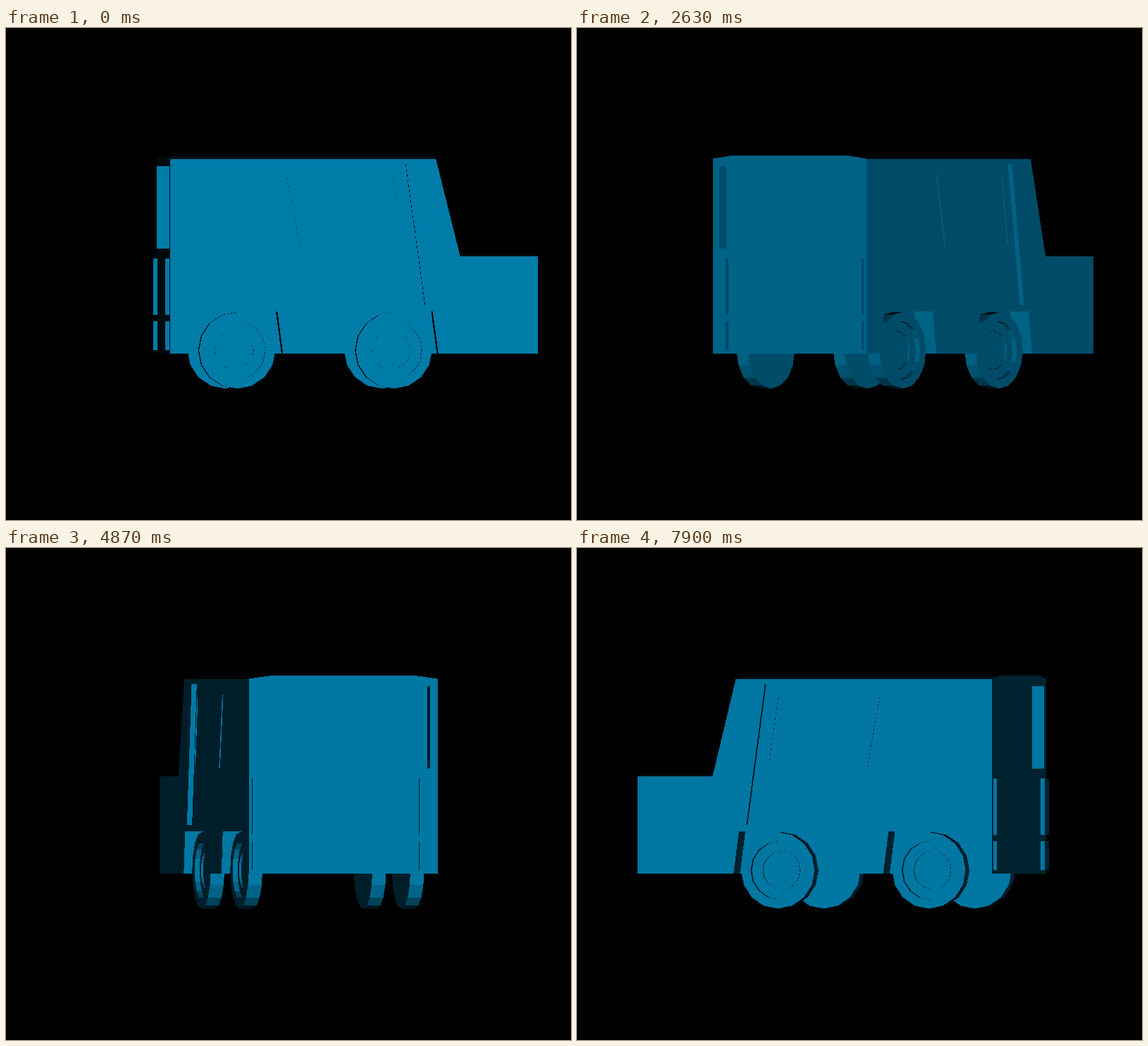
An HTML page without scripts for the animation above (8 s loop, 802 px wide and 698 px high).

```html
<!DOCTYPE html>
<html lang="en">
<head>
<meta charset="utf-8">
<title>Turning truck</title>
<style>
@property --a { syntax: "<angle>"; inherits: true; initial-value: 4deg; }

html, body { margin: 0; width: 100%; height: 100%; overflow: hidden; background: #000; }

/* --a turn, --c/--s its cosine and sine, --g the sign of the side in view */
svg {
  display: block; width: 100%; height: 100%;
  shape-rendering: crispEdges;
  --c: cos(var(--a));
  --s: sin(var(--a));
  --abs: max(var(--c), -1 * var(--c));
  --g: calc(var(--c) / var(--abs));
  --x: 0; --y: 0; --z: 0; --m: 1; --o: 0;
  animation: turn 8s steps(1) infinite;
}

/* 4 degrees per step, with uneven pauses */
@keyframes turn {
  0% { --a: 4deg; }
  1.75% { --a: 8deg; animation-timing-function: steps(3); }
  9.5% { --a: 20deg; }
  12.375% { --a: 24deg; }
  14.5% { --a: 28deg; }
  17.375% { --a: 32deg; animation-timing-function: steps(3); }
  25% { --a: 44deg; }
  27.875% { --a: 48deg; }
  30.75% { --a: 52deg; animation-timing-function: steps(4); }
  40.5% { --a: 68deg; }
  42.375% { --a: 72deg; }
  45.25% { --a: 76deg; animation-timing-function: steps(6); }
  58% { --a: 100deg; }
  60.875% { --a: 104deg; }
  63.75% { --a: 108deg; animation-timing-function: steps(4); }
  73.5% { --a: 124deg; }
  75.625% { --a: 128deg; animation-timing-function: steps(3); }
  83.25% { --a: 140deg; }
  86.125% { --a: 144deg; }
  88% { --a: 148deg; }
  90.875% { --a: 152deg; animation-timing-function: steps(3); }
  98.75%, 100% { --a: 164deg; }
}

/* flat shading, lit from the viewer */
.side, .disc, .roof, .rear, .wall, .facet {
  fill: rgb(0 calc(124 * var(--k)) calc(169 * var(--k)));
}
.side, .disc { --k: var(--abs); }
.rear, .wall { --k: var(--s); }
.roof { --k: calc(.12 * var(--abs)); }

/* planes along the truck, across it, and slanted walls */
.side, .roof { transform: matrix(var(--c), 0, 0, 1, calc(var(--z) * var(--g) * var(--s)), 0); }
.rear { transform: matrix(var(--s), 0, 0, 1, calc(var(--x) * var(--c)), 0); }
.wall {
  transform: matrix(calc(var(--g) * var(--s)), 0, calc(var(--lean) * var(--c)), 1,
    calc(var(--x) * var(--c)), var(--top));
}
.at { transform: matrix(1, 0, 0, 1, calc(var(--o) * var(--c)), var(--y)); }

/* sixteen-sided discs and the facets of their rims */
.disc {
  transform: matrix(calc(var(--r) * var(--c)), 0, 0, var(--r),
    calc(var(--x) * var(--c) + var(--g) * var(--z) * var(--s)), 0);
}
.facet {
  --p: calc(var(--i) * 22.5deg);
  --q: calc(var(--p) + 22.5deg);
  --k: calc(var(--s) * sin(var(--p) + 11.25deg));
  transform: matrix(
    calc(var(--g) * var(--w) * var(--s)), 0,
    calc(var(--m) * var(--r) * (sin(var(--p)) - sin(var(--q))) * var(--c)),
    calc(var(--r) * (cos(var(--p)) - cos(var(--q)))),
    calc((var(--x) - var(--m) * var(--r) * sin(var(--p))) * var(--c) + var(--g) * var(--z) * var(--s)),
    calc(-1 * var(--r) * cos(var(--p))));
}
</style>
</head>
<body>
<svg viewBox="-429 0 802 698">
  <defs>
    <path id="poly" d="M1 0L.924 .383L.707 .707L.383 .924L0 1L-.383 .924L-.707 .707L-.924 .383L-1 0L-.924 -.383L-.707 -.707L-.383 -.924L0 -1L.383 -.924L.707 -.707L.924 -.383z"/>
    <g id="rim">
      <path class="facet" style="--i:0" d="M0 0h1v1h-1z"/>
      <path class="facet" style="--i:1" d="M0 0h1v1h-1z"/>
      <path class="facet" style="--i:2" d="M0 0h1v1h-1z"/>
      <path class="facet" style="--i:3" d="M0 0h1v1h-1z"/>
      <path class="facet" style="--i:4" d="M0 0h1v1h-1z"/>
      <path class="facet" style="--i:5" d="M0 0h1v1h-1z"/>
      <path class="facet" style="--i:6" d="M0 0h1v1h-1z"/>
      <path class="facet" style="--i:7" d="M0 0h1v1h-1z"/>
    </g>
    <clipPath id="opening">
      <use class="disc" href="#poly" style="--r:41.5;--z:128;--x:-1"/>
    </clipPath>

    <g id="far">
      <use href="#rim" style="--r:54.3;--z:-128.5;--w:20"/>
      <use class="disc" href="#poly" style="--r:54.3;--z:-108.5"/>
    </g>
    <g id="near">
      <use href="#rim" style="--r:54.3;--z:108;--w:20"/>
      <use class="disc" href="#poly" style="--r:54.3;--z:128"/>
      <g clip-path="url(#opening)">
        <use href="#rim" style="--r:41.5;--z:120.5;--w:7.5;--x:-1;--m:-1"/>
        <use class="disc" href="#poly" style="--r:41.5;--z:120.5;--x:-1"/>
        <use href="#rim" style="--r:28;--z:120.5;--w:2;--x:-3"/>
        <use class="disc" href="#poly" style="--r:28;--z:122.5;--x:-3"/>
        <use href="#rim" style="--r:27;--z:119.5;--w:3;--x:-3;--m:-1"/>
        <use class="disc" href="#poly" style="--r:27;--z:119.5;--x:-3"/>
      </g>
    </g>
    <g id="arch">
      <path class="side" style="--z:105" d="M-57 402H55L63 461.700H-66z"/>
      <path class="wall" style="--x:55;--lean:.136;--top:402" d="M105 0h33.300v59.700h-33.300z"/>
    </g>
  </defs>

  <use class="at" href="#far" style="--o:113;--y:457.3"/>
  <use class="at" href="#far" style="--o:-110;--y:457.3"/>

  <use class="at" href="#arch" style="--o:112.5"/>
  <use class="at" href="#arch" style="--o:-108.5"/>
  <use class="at" href="#near" style="--o:113;--y:457.3"/>
  <use class="at" href="#near" style="--o:-110;--y:457.3"/>

  <!-- body side with wheel cut-outs -->
  <path class="roof" style="--z:121" d="M-206.5 181H172V187H-206.5zM206.4 320.600H317.5V325H206.4z"/>
  <path class="side" style="--z:138.3" d="M-206.5 185.600H172L206.4 323.600H317.5V461.700H175.5L167.5 402H55.5L46.5 461.700H-45.5L-53.5 402H-165.5L-174.5 461.700H-206.5z"/>

  <!-- door pillar and window edges -->
  <path class="wall" style="--x:129.2;--lean:.138;--top:193" d="M130.8 0h7.5v199.500h-7.5z"/>
  <path class="wall" style="--x:-40;--lean:.183;--top:208" d="M134.2 0h1.6v104h-1.6z"/>
  <path class="wall" style="--x:110.5;--lean:.144;--top:212" d="M133.8 0h1.4v95h-1.4z"/>

  <!-- back with recessed window and raised lamps -->
  <path class="rear" style="--x:-206.5" d="M-138.3 185.600L-105 181H105L138.3 185.600V461.700H-138.3z"/>
  <path class="side" style="--z:-127.3" d="M-206.5 196h17.5v116.600h-17.5z"/>
  <path class="rear" style="--x:-212.5" d="M-134 327h24v80h-24zm0 89h24v41h-24zM110 327h24v80h-24zm0 89h24v41h-24z"/>
  <path class="side" style="--z:-110" d="M-212.5 327h6v80h-6zm0 89h6v41h-6z"/>
  <path class="side" style="--z:134" d="M-212.5 327h6v80h-6zm0 89h6v41h-6z"/>
</svg>
</body>
</html>
```
